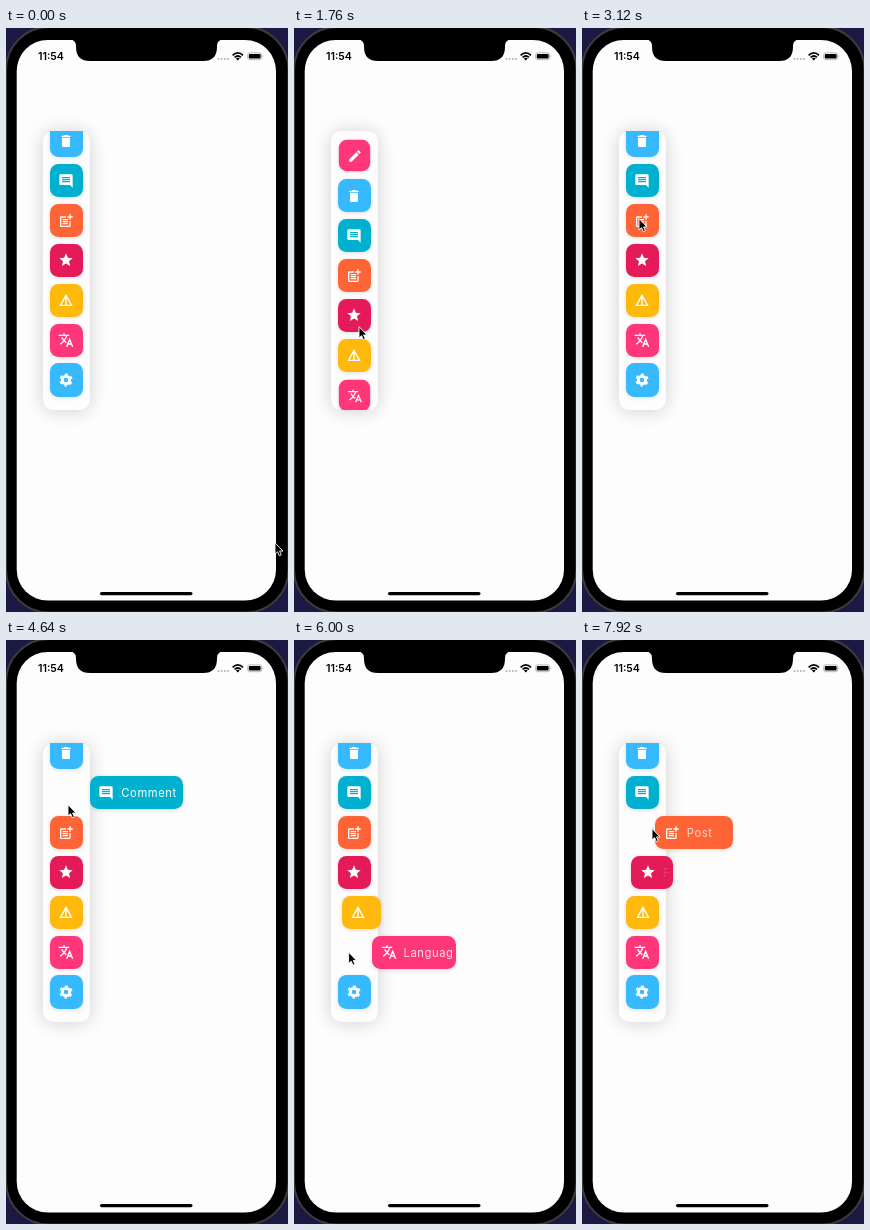
Write an HTML page that moves like this. It is 282x584 px and loops after 8 s.

```html
<!DOCTYPE html>
<html lang="en">
<head>
<meta charset="utf-8">
<title>Expandable toolbar</title>
<style>
  html, body { margin: 0; width: 100%; height: 100%; overflow: hidden; background: #1b1942; }
  #stage { position: relative; width: 282px; height: 584px; overflow: hidden; }
  #stage > svg { position: absolute; left: 0; top: 0; overflow: visible; }
  .panel { position: absolute; left: 37px; top: 103px; width: 47px; height: 279px;
    border-radius: 10px; background: #fdfdfd; box-shadow: 0 1px 18px rgba(0, 0, 0, .18); }
  #list { position: absolute; left: 0; top: 103px; width: 282px; height: 279px; overflow: hidden; }
  .item { position: absolute; height: 33.2px; border-radius: 8.5px; color: #fff;
    box-shadow: 0 1px 4px rgba(0, 0, 0, .13); }
  .item svg { position: absolute; left: 8.6px; top: 8.6px; width: 16px; height: 16px; }
  .item span { position: absolute; left: 31.5px; right: 4px; overflow: hidden; white-space: nowrap;
    font: 400 11.2px/34px Inter, sans-serif; letter-spacing: .6px; }
  .fill { fill: #fff; fill-rule: evenodd; }
  .line { fill: none; stroke: #fff; stroke-width: 2; }
</style>
</head>
<body>
<div id="stage">
  <svg width="282" height="584">
    <rect x="0" y="-1" width="282.5" height="585.5" rx="43" stroke="#3c3c40" stroke-width="2"/>
    <rect x="10.7" y="12" width="259.3" height="560.6" rx="31" fill="#fdfdfd"/>
    <path d="M64 11.5Q70 12 70 18V19Q70 33 84 33H197Q211 33 211 19V18Q211 12 217 11.5Z"/>
    <text x="32" y="32" font-family="Inter, sans-serif" font-size="10.6" font-weight="600">11:54</text>
    <path d="M212.6 31H223" stroke="#b5b5b5" stroke-width="2" stroke-linecap="round" stroke-dasharray="0 3.1"/>
    <path d="M226.6 27.3Q231.8 22.6 237 27.3M228.6 29.4Q231.8 26.6 235 29.4" fill="none" stroke="#000" stroke-width="1.7"/>
    <path d="M229.9 30.5Q231.8 29 233.7 30.5L231.8 32.5Z"/>
    <rect x="241.7" y="24.9" width="14" height="6.8" rx="2" fill="none" stroke="#999" stroke-width=".7"/>
    <rect x="242.8" y="26" width="11.8" height="4.6" rx="1.1"/>
    <path d="M256.6 27.2Q258 28.3 256.6 29.4Z" fill="#999"/>
    <rect x="94" y="564" width="92.5" height="3.2" rx="1.6"/>
  </svg>
  <div class="panel"></div>
  <div id="list"></div>
  <svg id="cursor" width="10" height="15">
    <path d="M0 0V11.3L2.6 9L4.3 13L6.3 12.1L4.6 8.3H8Z" stroke="#fff" stroke-width=".9"/>
  </svg>
</div>
<script>
const LOOP = 8000, PITCH = 39.87, SIZE = 33.2, MAX_SCROLL = 53.2;
const EXPAND_MS = 400, LONG_PRESS = 3500, POINTER_LEAD = 155;
const DRAG_ROW = 4.28, DRAG_START = 1000, DRAG_END = 2700;

const fill = d => `<path class="fill" d="${d}"/>`;
const line = d => `<path class="line" d="${d}"/>`;
const gear = `<g class="line" transform="rotate(90 12 12)">
  <circle cx="12" cy="12" r="5.6" stroke-width="4.2"/>
  <circle cx="12" cy="12" r="8.3" stroke-width="3.2" pathLength="12" stroke-dasharray="1" stroke-dashoffset=".5"/></g>`;

const items = [
  ['Edit', '#ff3778', fill('M3 17.3V21h3.7L17.8 9.9l-3.7-3.7zM20.7 7q.8-.7 0-1.4l-2.3-2.3q-.7-.7-1.4 0l-1.9 1.8 3.8 3.8z')],
  ['Delete', '#36b9fd', fill('M6 7H18V19Q18 21 16 21H8Q6 21 6 19zM5 4H8.5l1-1h5l1 1H19V6H5z')],
  ['Comment', '#00b1cf', fill('M2 4Q2 2 4 2H20Q22 2 22 4V22L18 18H4Q2 18 2 16zM6 6V8H18V6zM6 9V11H18V9zM6 12V14H18V12z')],
  ['Post', '#ff6437', line('M12 6H5Q4 6 4 7V19Q4 20 5 20H17Q18 20 18 19V12M18 2V10M14 6H22M7 10H15M7 13H15M7 16H15')],
  ['Favorite', '#e41a59', fill('M12 17.3L18.2 21l-1.7-7L22 9.2l-7.2-.6L12 2 9.2 8.6 2 9.2l5.5 4.8L5.8 21z')],
  ['Details', '#ffb90c', line('M12 5L3.7 20H20.3zM12 6V20')],
  ['Languages', '#ff3778', line('M1 5H17M9 2V5M13.2 5Q11 13 3.2 18.3M5.6 8Q8 12.7 12.5 16M13 22L17.5 11L22 22M14.5 18H20.5')],
  ['Settings', '#36b9fd', gear]
].map(([label, color, icon]) => {
  const box = document.createElement('div');
  box.className = 'item';
  box.style.background = color;
  box.innerHTML = `<svg viewBox="0 0 24 24">${icon}</svg><span>${label}</span>`;
  list.append(box);
  return { box, text: box.lastChild };
});

// pointer stops: time, x, row of the toolbar
const stops = [
  [300, 269, 11.08], [1050, 62, DRAG_ROW], [1300, 62, DRAG_ROW], [1750, 65, 5.66],
  [2050, 65, 5.66], [2550, 62, DRAG_ROW], [2850, 62, DRAG_ROW], [3200, 57, 2.95],
  [3960, 57, 2.95], [4270, 62, 2.3], [4800, 62, 2.3], [5365, 55, 3.5],
  [5828, 52, 6], [7080, 62, 6], [7260, 80, 7], [7470, 85, 7], [7565, 87, 4.5], [7790, 70, 2.9]
];

function pointer(t) {
  const next = stops.findIndex(s => s[0] > t);
  if (next < 1) return stops.at(next);
  const a = stops[next - 1], b = stops[next];
  const u = (t - a[0]) / (b[0] - a[0]);
  return a.map((v, i) => v + (b[i] - v) * u);
}

const rowTop = row => 6.6 + PITCH * row - MAX_SCROLL;

// moments at which the finger enters a new row
const touches = [];
for (let t = LONG_PRESS; t < LOOP; t += 5) {
  const row = Math.round(pointer(t)[2]);
  if (row !== touches.at(-1)?.row) touches.push({ t, row });
}

function expansion(index, t) {
  let from = 0, goal = 0, start = 0;
  const valueAt = time =>
    from + (goal - from) * Math.sin(Math.min(1, (time - start) / EXPAND_MS) * Math.PI / 2);
  for (const touch of touches) {
    const newGoal = +(touch.row === index);
    if (touch.t > t || newGoal === goal) continue;
    from = valueAt(touch.t);
    goal = newGoal;
    start = touch.t;
  }
  return valueAt(t);
}

function draw(now) {
  const t = now % LOOP;
  const dragging = t > DRAG_START && t < DRAG_END;
  const pull = dragging ? Math.min(55, Math.max(0, (pointer(t)[2] - DRAG_ROW) * PITCH)) : 0;
  items.forEach(({ box, text }, i) => {
    const p = expansion(i, t);
    box.style.left = 43.8 + 40 * p + 'px';
    box.style.top = rowTop(i) + pull + 'px';
    box.style.width = SIZE + 60 * p + 'px';
    // items at the list ends shrink slightly while pulled
    box.style.transform = i % 6 ? '' : `scale(${1 - pull / 1100})`;
    text.style.opacity = p;
  });
  const [, x, row] = pointer(t + POINTER_LEAD);
  cursor.style.transform = `translate(${x}px, ${103 + rowTop(row) + SIZE / 2}px)`;
  requestAnimationFrame(() => draw(performance.now()));
}
draw(performance.now());
</script>
</body>
</html>
```
